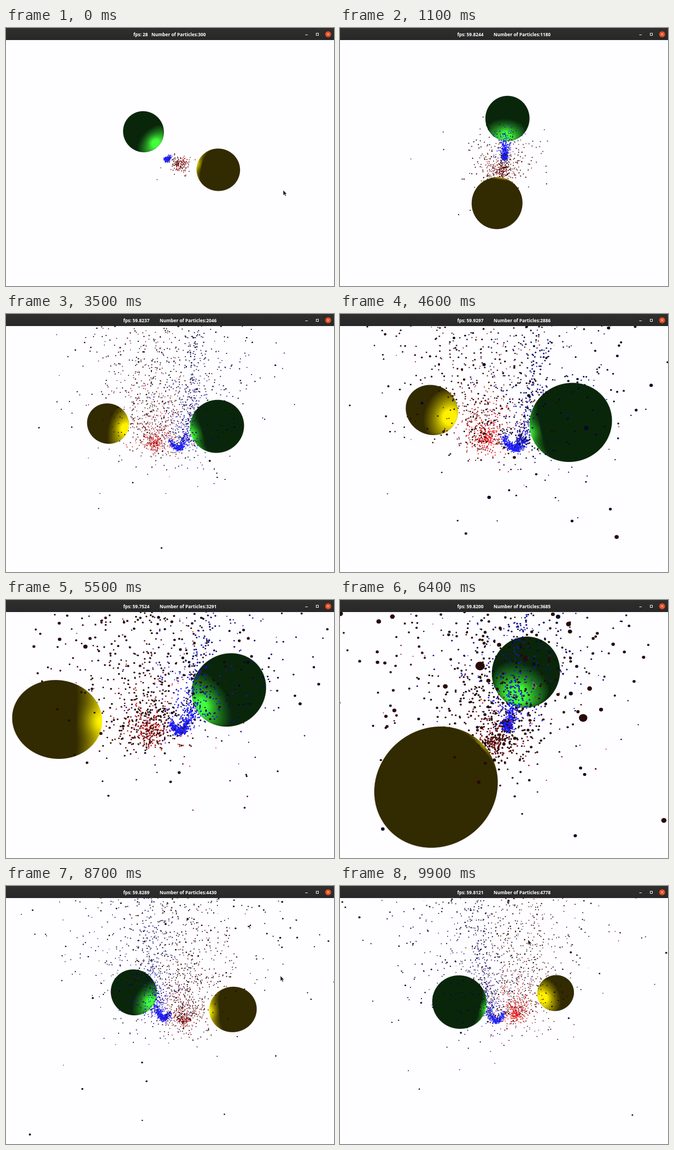
Recreate the animation shown at these times as an HTML page with a canvas. Size 600x471 px, loop 10 s.

```html
<!DOCTYPE html>
<html lang="en">
<head>
<meta charset="utf-8">
<title>Particles</title>
<style>
  html, body { margin: 0; width: 600px; height: 471px; overflow: hidden; background: #fefdff; }
  canvas, svg { position: absolute; left: 0; top: 0; display: block; }
  text { font: bold 8.3px "Open Sans", "Noto Sans", sans-serif; fill: #fff; white-space: pre; }
</style>
</head>
<body>
<canvas id="stage" width="600" height="471"></canvas>
<svg width="600" height="471" viewBox="0 0 600 471">
  <defs>
    <linearGradient id="bar" x2="0" y2="1">
      <stop offset="0" stop-color="#302f2e"/><stop offset="1" stop-color="#282828"/>
    </linearGradient>
  </defs>
  <rect width="600" height="22" fill="url(#bar)"/>
  <text id="fps" y="14.5"></text>
  <text id="count" y="14.5"></text>
  <g fill="none" stroke="#eee">
    <path d="M547.5 12.5h4.5"/>
    <rect x="567.5" y="9.5" width="4" height="4"/>
    <circle cx="589.3" cy="11.4" r="5.5" fill="#e8491d" stroke="none"/>
    <path d="M587.2 9.3l4.2 4.2m0-4.2l-4.2 4.2"/>
  </g>
  <path id="cursor" d="M0 0v9.5l2.2-2 1.6 3.6 1.7-.8-1.6-3.4h3z" fill="#222" stroke="#eee" stroke-width=".5"/>
</svg>
<script>
const LOOP = 10000, STEP = 100, FOCAL = 360, CX = 300, CY = 246.5;
const RATE = 600, HEAD_START = 0.5, DOT_RADIUS = .02;

// The viewer drags the camera around the origin and zooms.
const CAMERA = [
  { t: 0,    yaw: -47,  pitch: 38, dist: 9.43 },
  { t: 1100, yaw: 5,    pitch: 50, dist: 8.6 },
  { t: 2200, yaw: 58,   pitch: 23, dist: 10.13 },
  { t: 4600, yaw: 110,  pitch: 24, dist: 6.09 },
  { t: 6400, yaw: 21,   pitch: 39, dist: 5.23 },
  { t: 7500, yaw: 21,   pitch: 39, dist: 7.55 },
  { t: 8700, yaw: -63,  pitch: 26, dist: 8.45 },
  { t: 9900, yaw: -111, pitch: 21, dist: 8.43 }
];
const CURSORS = [
  { from: 0, to: 200, x: 507, y: 296 },
  { from: 6200, to: 6700, x: 353, y: 150 },
  { from: 8500, to: 8900, x: 502, y: 164 },
  { from: 9700, to: LOOP, x: 344, y: 98 }
];

// World positions: along the sphere axis, across it, up.
const LIGHT = [0, 0, .35];
const BALLS = [
  { at: [1.78, 0, 1], radius: 1, dark: [9, 38, 11], lit: [66, 255, 58] },
  { at: [-2.48, 0, 1], radius: .8, dark: [50, 42, 0], lit: [255, 242, 0] }
];

const $ = id => document.getElementById(id);
const ctx = $("stage").getContext("2d");
const ballCanvas = document.createElement("canvas");
const clamp = v => Math.max(0, Math.min(1, v));
const dot = (a, b) => a[0] * b[0] + a[1] * b[1] + a[2] * b[2];
const sub = (a, b) => a.map((v, i) => v - b[i]);

let seed = 20431;
function rand() {
  seed = (seed + 0x6D2B79F5) | 0;
  let n = Math.imul(seed ^ seed >>> 15, 1 | seed);
  n = n + Math.imul(n ^ n >>> 7, 61 | n) ^ n;
  return ((n ^ n >>> 14) >>> 0) / 4294967296;
}
const gauss = () => (rand() + rand() + rand() + rand() - 2) * 1.73;

const frameRates = Array.from({ length: 12 }, () => (59.75 + rand() * .2).toFixed(4));

const particles = Array.from({ length: (LOOP / 1000 + HEAD_START) * RATE }, (_, i) => {
  const drift = rand() < .08;
  return {
    blue: i % 2 === 1,
    born: i / RATE - HEAD_START,
    life: 3 + rand() * 11,
    lift: drift ? .3 : .5 + .8 * rand(),
    speed: drift ? .75 : .43,
    scatter: rand() < .65 ? .6 : .06,
    dir: [gauss(), gauss(), gauss()]
  };
});

// Blue is a jet that breaks up on the green sphere, red a diffuse fountain.
function place(p, age) {
  const [a, b, c] = p.dir;
  if (p.blue) {
    const s = .05 + .03 * age + p.scatter * Math.max(0, age - 1.1);
    const rise = p.scatter > .1 ? Math.min(age, 1.1) ** 2 * 1.2 + Math.max(0, age - 1.1) * (1.3 + p.lift * age / 2)
      : 1.2 * age * age;
    return [1.2 * (1 - Math.exp(-.6 * age)) + a * s, b * s, .4 - 1.3 * age + rise + c * s];
  }
  const s = .1 + p.speed * age;
  return [a * s - .58, b * s, .22 + c * s * .85 + p.lift * age * age / 2];
}

// Monotone cubic through the camera keys.
function ease(t, name) {
  const last = CAMERA.length - 1;
  let i = 0;
  while (i < last - 1 && t > CAMERA[i + 1].t) i++;
  const slope = n => n < 0 || n >= last ? 0 :
    (CAMERA[n + 1][name] - CAMERA[n][name]) / (CAMERA[n + 1].t - CAMERA[n].t);
  const tangent = n => {
    const a = slope(n - 1), b = slope(n);
    return a * b > 0 ? 2 * a * b / (a + b) : 0;
  };
  const from = CAMERA[i], to = CAMERA[i + 1], h = to.t - from.t;
  const u = clamp((t - from.t) / h), v = 1 - u;
  return from[name] * (1 + 2 * u) * v * v + to[name] * u * u * (3 - 2 * u)
    + h * u * v * (v * tangent(i) - u * tangent(i + 1));
}

// Returns a function from world to camera space (right, down, away).
function viewAt(t) {
  const yaw = ease(t, "yaw") * Math.PI / 180, pitch = ease(t, "pitch") * Math.PI / 180;
  const dist = ease(t, "dist");
  const sy = Math.sin(yaw), cy = Math.cos(yaw), sp = Math.sin(pitch), cp = Math.cos(pitch);
  return ([along, across, up]) => {
    const away = along * cy - across * sy;
    return [along * sy + across * cy, -up * cp - away * sp, dist + away * cp - up * sp];
  };
}

function shade(normal, point, ray, light) {
  const toLight = sub(light, point), len = Math.hypot(...toLight);
  const l = toLight.map(v => v / len);
  const diffuse = dot(normal, l);
  if (diffuse <= 0) return 0;
  const half = sub(l, ray);
  const gloss = Math.max(0, dot(normal, half) / Math.hypot(...half)) ** 10;
  return clamp(diffuse + .35 * gloss);
}

// Casts one ray per pixel, so that perspective stretches the sphere.
function drawBall({ center, radius, dark, lit, light }) {
  const k = FOCAL / center[2], reach = radius * k * 1.45 + 3;
  const left = Math.floor(CX + center[0] * k - reach), top = Math.floor(CY + center[1] * k - reach);
  const size = Math.ceil(2 * reach), image = new ImageData(size, size);
  const centerSq = dot(center, center);
  for (let j = 0, o = 0; j < size; j++) {
    for (let i = 0; i < size; i++, o += 4) {
      const dx = left + i + .5 - CX, dy = top + j + .5 - CY, len = Math.hypot(dx, dy, FOCAL);
      const ray = [dx / len, dy / len, FOCAL / len];
      const mid = dot(center, ray), missSq = centerSq - mid * mid;
      const cover = clamp((radius - Math.sqrt(missSq)) * k + .5);
      if (!cover) continue;
      const hit = mid - Math.sqrt(Math.max(0, radius * radius - missSq));
      const point = ray.map(v => v * hit);
      const normal = sub(point, center).map(v => v / radius);
      const bright = shade(normal, point, ray, light);
      for (let c = 0; c < 3; c++) image.data[o + c] = dark[c] + (lit[c] - dark[c]) * bright;
      image.data[o + 3] = 255 * cover;
    }
  }
  ballCanvas.width = ballCanvas.height = size;
  ballCanvas.getContext("2d").putImageData(image, 0, 0);
  ctx.drawImage(ballCanvas, left, top);
}

function drawDot({ x, y, r, bright, blue }) {
  const main = Math.round(40 + 205 * bright), rest = Math.round(8 + 22 * bright);
  ctx.fillStyle = blue ? `rgb(${rest},${rest},${main})` : `rgb(${main},${rest},${rest})`;
  if (r < .85) return ctx.fillRect(x - r, y - r, 2 * r, 2 * r);
  ctx.beginPath();
  ctx.ellipse(x, y, r, r * .93, 0, 0, 7);
  ctx.fill();
}

function visibleDots(t, view, light) {
  const dots = [];
  for (const p of particles) {
    const age = t / 1000 - p.born;
    if (age < 0) break;
    if (age > p.life) continue;
    const pos = view(place(p, age)), depth = pos[2];
    if (depth < .8) continue;
    const k = FOCAL / depth, x = CX + pos[0] * k, y = CY + pos[1] * k;
    if (x < -9 || x > 609 || y < 12 || y > 480) continue;
    const fromLight = sub(pos, light);
    const facing = fromLight[2] / (Math.hypot(...fromLight) + .01);
    const glow = Math.max(.15, (p.blue ? 1.6 : .9) - .4 * age);
    dots.push({ x, y, depth, r: DOT_RADIUS * k, blue: p.blue, bright: clamp(facing + glow) });
  }
  return dots;
}

function showTitle(t) {
  const n = Math.floor((t + 800) / 900);
  $("fps").textContent = "fps: " + (n ? frameRates[n] : 28);
  $("fps").setAttribute("x", n ? 214.5 : 233);
  $("count").textContent = "Number of Particles:" + Math.round(300 + n * (441 - .28 * n * n));
  $("count").setAttribute("x", n ? 281 : 266);
}

function render(t) {
  ctx.fillStyle = "#fefdff";
  ctx.fillRect(0, 0, 600, 471);
  const view = viewAt(t), light = view(LIGHT);
  const items = visibleDots(t, view, light);
  for (const ball of BALLS) {
    const center = view(ball.at);
    items.push({ ...ball, center, light, depth: center[2] });
  }
  items.sort((a, b) => b.depth - a.depth);
  for (const item of items) item.center ? drawBall(item) : drawDot(item);

  showTitle(t);
  const spot = CURSORS.find(c => t >= c.from && t < c.to);
  $("cursor").style.display = spot ? "" : "none";
  if (spot) $("cursor").setAttribute("transform", `translate(${spot.x} ${spot.y})`);
}

const begin = performance.now();
let shown = -1;
function tick() {
  const t = Math.floor((performance.now() - begin) % LOOP / STEP) * STEP;
  if (t !== shown) render(shown = t);
  requestAnimationFrame(tick);
}
tick();
</script>
</body>
</html>
```
